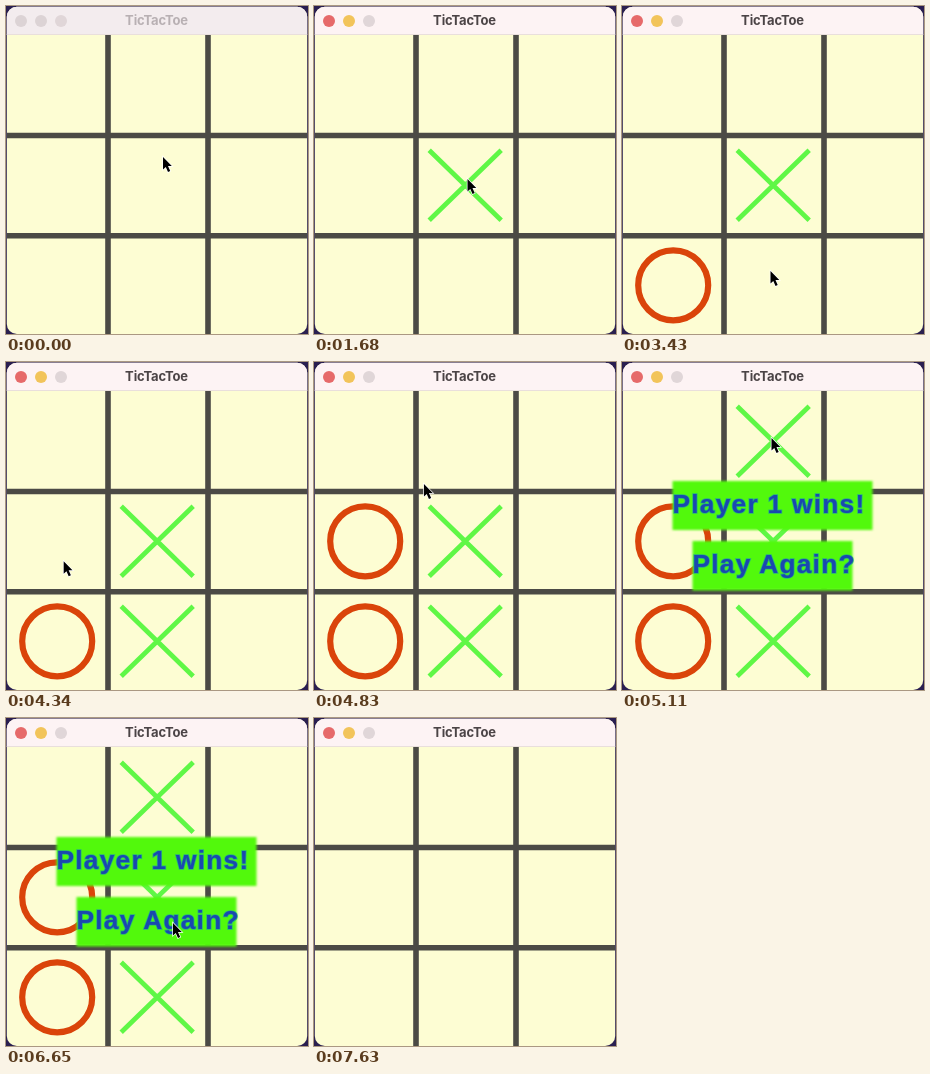
An HTML page for the animation above (7840 ms loop, 302 px wide and 328 px high).

```html
<!DOCTYPE html>
<html lang="en">
<head>
<meta charset="utf-8">
<title>TicTacToe</title>
<style>
  html, body { margin: 0; width: 100%; height: 100%; overflow: hidden; background: #2a1f50; }
  svg { display: block; width: 302px; height: 328px; }
  .title { font: 700 13px Inter, "Liberation Sans", sans-serif; letter-spacing: -.15px; text-anchor: middle; }
  .banner rect { fill: #52f90c; filter: blur(.8px); }
  .banner text {
    font: 700 26.3px "Liberation Sans", Arial, sans-serif; letter-spacing: 1.25px;
    fill: #1a48b0; stroke: #26b47c; stroke-width: 1.6px; paint-order: stroke;
  }
  #cross { filter: blur(.7px); }
</style>
</head>
<body>
<svg viewBox="0 0 302 328">
  <defs>
    <clipPath id="window"><rect x=".8" y=".8" width="300.4" height="327.2" rx="10"/></clipPath>
    <path id="cross" d="M-36-35 36 35M36-35-36 35" fill="none" stroke="#5ff746" stroke-width="4.8"/>
    <circle id="ring" r="35" fill="none" stroke="#da440a" stroke-width="6.2"/>
  </defs>

  <g clip-path="url(#window)">
    <rect width="302" height="328" fill="#fdfdd3"/>
    <path d="M102 29V328M202 29V328M0 129.5H302M0 229.7H302" stroke="#4b4a45" stroke-width="5.6"/>
    <g id="marks"></g>
    <g id="banners" class="banner">
      <rect x="50.5" y="119" width="200" height="49"/>
      <rect x="70.5" y="179" width="160" height="49.5"/>
      <text x="50.5" y="150.8">Player 1 wins!</text>
      <text x="70.5" y="210.8">Play Again?</text>
    </g>
    <rect id="bar" width="302" height="29"/>
    <path d="M0 28.5H302" stroke="#e9dfdc"/>
    <g id="lights">
      <circle cx="15" cy="15" r="6"/>
      <circle cx="35" cy="15" r="6"/>
      <circle cx="55" cy="15" r="6" fill="#e0d6d8"/>
    </g>
    <text id="title" class="title" x="150.5" y="19.3">TicTacToe</text>
  </g>
  <path id="cursor" d="M0 0V12.4L2.8 9.9 5 15 7.2 14 5 9H8.8Z"
        stroke="#fff" stroke-width="1.4" paint-order="stroke"/>
</svg>
<script>
const LOOP = 7840, STEP = 70;
const ACTIVE = 140, WIN = 5110, RESET = 6720, LEAVE = 7630;

// players alternate: column, row, time placed
const moves = [[1, 1, 1680], [0, 2, 2730], [1, 2, 3570], [0, 1, 4550], [1, 0, WIN]];

// pointer trips: start, end, destination
const home = [157, 151];
const trips = [
  [1050, 1260, 153.5, 173],
  [1750, 2240, 48, 272],
  [3010, 3430, 148.5, 265],
  [3710, 4480, 49, 193],
  [4550, 5040, 149.5, 76],
  [5320, 6160, 167, 205],
  [7420, LEAVE, 155, 327]
];

const $ = id => document.getElementById(id);
const show = (el, on) => el.setAttribute("visibility", on ? "visible" : "hidden");
const ease = p => p * p * (3 - 2 * p);

const marks = moves.map(([col, row, at], i) => {
  const el = document.createElementNS("http://www.w3.org/2000/svg", "use");
  el.setAttribute("href", i % 2 ? "#ring" : "#cross");
  el.setAttribute("transform", `translate(${51.2 + 100 * col} ${79.3 + 100 * row})`);
  $("marks").append(el);
  return { el, at };
});

function pointer(t) {
  return trips.reduce(([x, y], [from, to, x1, y1]) => {
    const p = ease(Math.min(1, Math.max(0, (t - from) / (to - from))));
    return [x + (x1 - x) * p, y + (y1 - y) * p];
  }, home);
}

function paintBar(active) {
  const [red, yellow] = $("lights").children;
  red.setAttribute("fill", active ? "#e66a6a" : "#dcd3d5");
  yellow.setAttribute("fill", active ? "#f2c45a" : "#dcd3d5");
  $("bar").setAttribute("fill", active ? "#fdf3f4" : "#f3ecee");
  $("title").setAttribute("fill", active ? "#4b4446" : "#b8b0b3");
}

function draw(time) {
  const t = Math.floor((time % LOOP) / STEP) * STEP;
  paintBar(t >= ACTIVE);
  marks.forEach(m => show(m.el, t >= m.at && t < RESET));
  show($("banners"), t >= WIN && t < RESET);
  show($("cursor"), t < LEAVE);
  $("cursor").setAttribute("transform", `translate(${pointer(t)})`);
}

const start = performance.now();
function tick(now) {
  draw(Math.max(0, now - start));
  requestAnimationFrame(tick);
}
draw(0);
requestAnimationFrame(tick);
</script>
</body>
</html>
```
